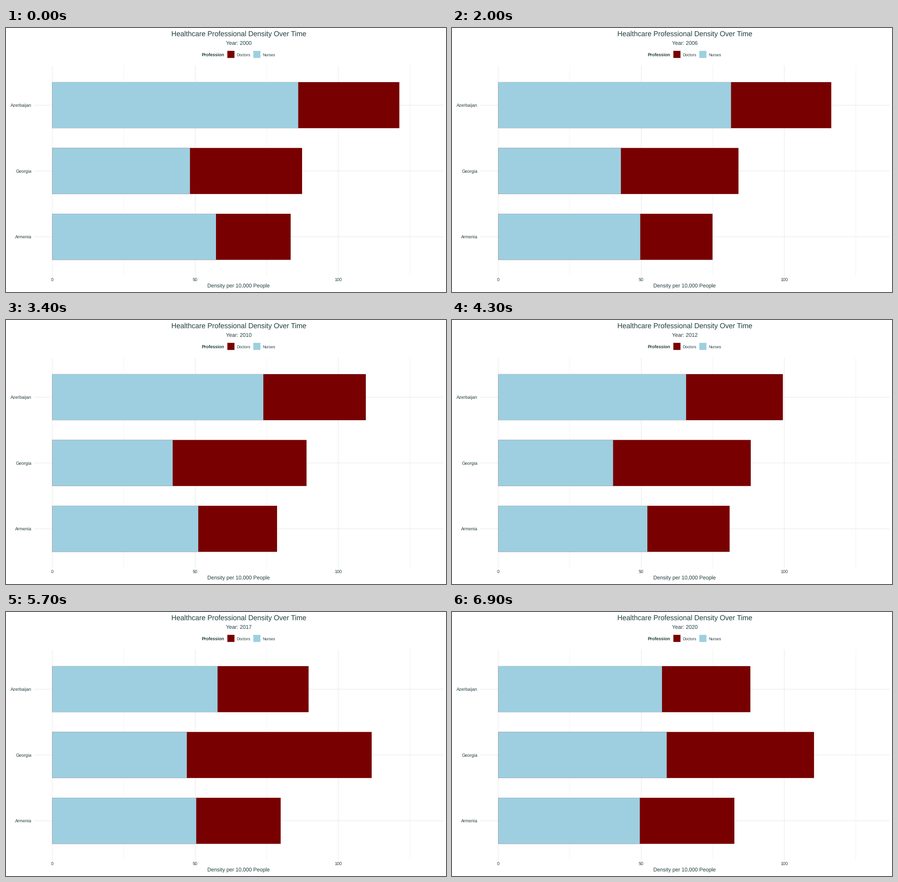
Animation of 966x580 px, one loop 10 s. Source, as a matplotlib script:

```python
import matplotlib.pyplot as plt
import numpy as np
from matplotlib.animation import FuncAnimation
from matplotlib.patches import Rectangle

W, H, DPI = 966, 580, 64
PT = 72 / DPI                      # points per pixel
STEP_MS, FRAMES, LAST = 100, 100, 69
START, SPAN = 2000, 20             # first year, years covered

RED, BLUE = "#780000", "#9dcfe0"
INK, GRID = "#233e3e", "#e9e9e9"

LEFT, RIGHT, TOP, BOTTOM = 61.5, 960.5, 82.7, 545.5
MID = (LEFT + RIGHT) / 2
ZERO, UNIT = 101.5, 6.28           # x of zero, pixels per unit of density
ROW_Y, ROW_GAP = 169.5, 144.63
BAR_H = 0.7 * ROW_GAP

# Turning points of each trend: years since START -> density, (nurses, doctors)
TRENDS = {
    "Azerbaijan": (
        {0: 86, 3: 81.75, 6: 81.35, 8: 81.9, 9: 79.7, 10: 73.8,
         13: 64.05, 17: 56.9, 20: 57.25},
        {0: 35.35, 6: 35.03, 10: 35.83, 13: 33.44, 17: 31.6, 20: 30.9}),
    "Georgia": (
        {0: 48.15, 3: 44.9, 6: 42.7, 7: 41.65, 10: 42.1, 12: 39.8,
         16: 42.6, 17: 51.5, 20: 58.9},
        {0: 39.2, 5: 40.1, 10: 46.8, 13: 48.4, 16: 63.85, 17: 65.4,
         19: 71.9, 20: 51.5}),
    "Armenia": (
        {0: 57.25, 3: 48, 6: 49.8, 10: 51.05, 13: 52.35, 17: 50.05,
         19: 48.3, 20: 49.5},
        {0: 26.1, 3: 23.8, 6: 25.4, 10: 27.55, 13: 29, 17: 29.6, 20: 33.05}),
}

# Every year is reached on a whole frame
YEARS = np.arange(SPAN + 1)
YEAR_FRAMES = np.rint(YEARS * LAST / SPAN)

plt.rcParams.update({
    "font.family": "Liberation Sans",
    "text.hinting": "none",
    "toolbar": "None",
})

fig = plt.figure(figsize=(W / DPI, H / DPI), dpi=DPI, facecolor="white")
ax = fig.add_axes([0, 0, 1, 1])
ax.set_xlim(0, W)
ax.set_ylim(H, 0)
ax.axis("off")


def text(x, y, s, px, ha="center", weight="normal"):
    return ax.text(x, y, s, fontsize=px * PT, ha=ha, va="baseline",
                   color=INK, weight=weight)


def line(xs, ys, px):
    ax.plot(xs, ys, color=GRID, lw=px * PT, solid_capstyle="butt",
            snap=False, zorder=1)


def rect(x, y, w, h, color):
    patch = Rectangle((x, y), w, h, fc=color, ec="none", lw=0,
                      snap=False, zorder=2)
    return ax.add_patch(patch)


def draw_legend():
    text(429, 62, "Profession", 9.65, "left", "bold")
    for x, color, name in ((486, RED, "Doctors"), (543, BLUE, "Nurses")):
        rect(x, 50.2, 15.6, 15.6, color)
        text(x + 20.2, 62, name, 8.8, "left")


def draw_x_axis():
    for value in range(0, 126, 25):
        x = ZERO + value * UNIT
        major = value % 50 == 0
        line([x, x], [TOP, BOTTOM], 1.07 if major else 0.53)
        if major:
            text(x, 557, str(value), 9.8)
    text(MID, 570.5, "Density per 10,000 People", 11.65)


def add_row(name, y):
    """Draw a row's grid line and label; return its total and nurse bars."""
    line([LEFT, RIGHT], [y, y], 1.07)
    text(56.5, y + 3.5, name, 9.8, "right")
    # The total lies under the nurses, so no seam shows between them
    return [rect(ZERO, y - BAR_H / 2, 0, BAR_H, c) for c in (RED, BLUE)]


def density(trend, year):
    return np.interp(year, list(trend), list(trend.values()))


text(MID, 18, "Healthcare Professional Density Over Time", 15.5)
year_label = text(MID, 37, "", 11.7)
draw_legend()
draw_x_axis()
bars = {name: add_row(name, ROW_Y + i * ROW_GAP)
        for i, name in enumerate(TRENDS)}


def update(frame):
    k = min(frame, LAST)
    year_label.set_text(f"Year: {round(START + SPAN * k / LAST)}")
    year = np.interp(k, YEAR_FRAMES, YEARS)
    for name, (total_bar, nurse_bar) in bars.items():
        nurses, doctors = (density(t, year) for t in TRENDS[name])
        nurse_bar.set_width(nurses * UNIT)
        total_bar.set_width((nurses + doctors) * UNIT)
    return [year_label]


anim = FuncAnimation(fig, update, frames=FRAMES, interval=STEP_MS,
                     init_func=lambda: update(0), repeat=True,
                     repeat_delay=0, blit=False)
plt.show()
```
